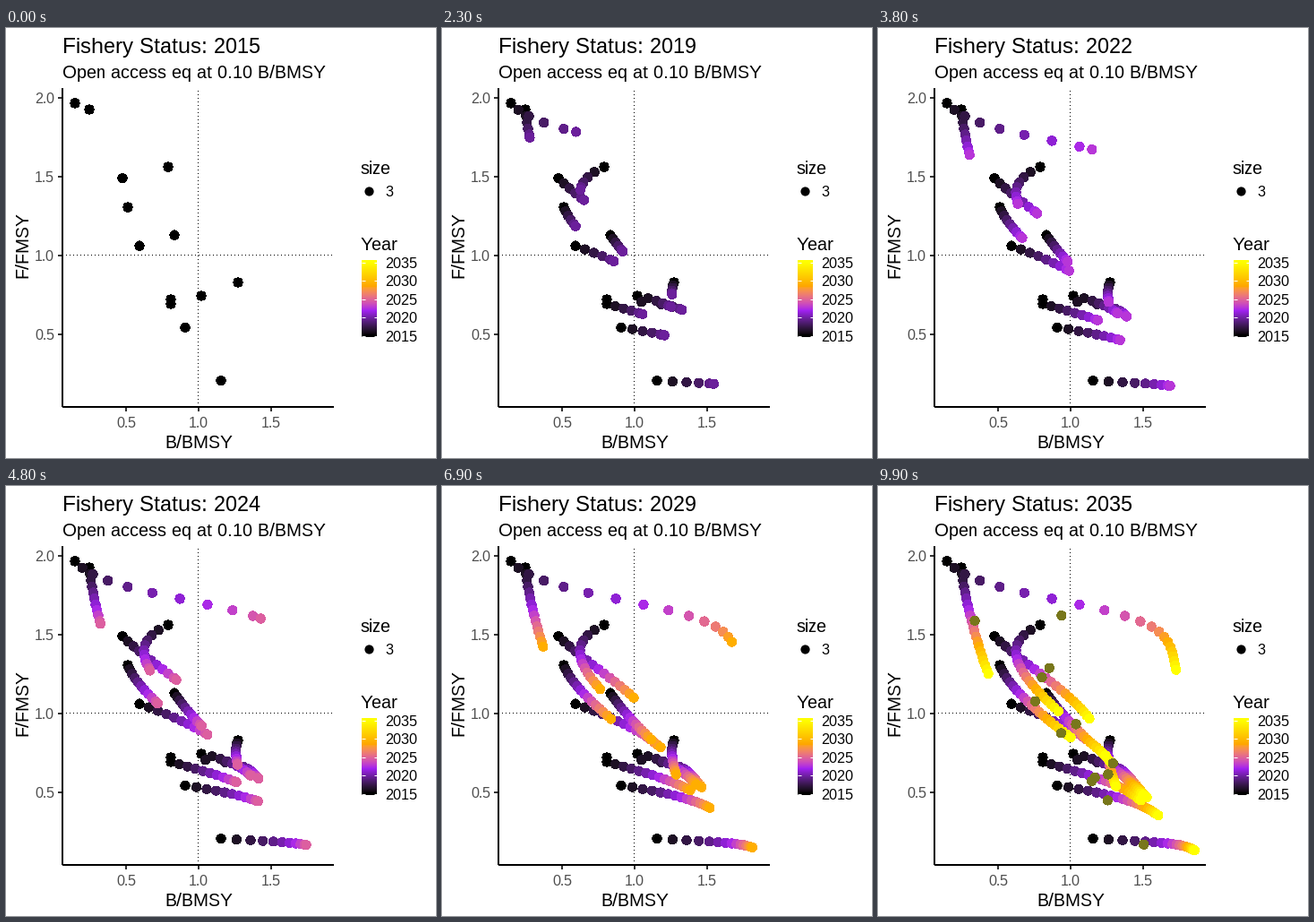
Recreate the animation shown at these times as a matplotlib script. Size 480 by 480 pixels, loop 10 s.

```python
import numpy as np
import matplotlib.pyplot as plt
from matplotlib.animation import FuncAnimation

plt.rcParams.update({"font.family": "Liberation Sans",
                     "text.hinting": "native", "text.hinting_factor": 1})

SIZE, DPI = 480, 96
PX = 72 / DPI                      # one pixel in points
LEFT, RIGHT, TOP, BOTTOM = 63, 366, 67, 423
FIRST, LAST = 2015, 2035
YEARS = LAST - FIRST
F_DECAY = 0.9787                   # yearly change of fishing pressure


def x_px(biomass):
    return 215 + 162 * (biomass - 1)


def y_px(pressure):
    return 254 - 176.4 * (pressure - 1)


def fishery(pressure, start, drift, jump, rate, lag=0):
    """Yearly path: steady drift plus a saturating recovery, F decaying."""
    t = np.arange(YEARS + 1)
    left = np.exp(-rate * t)
    x = start + drift * t + jump * (1 - left) / (1 + lag * left)
    return np.column_stack([x, y_px(pressure * F_DECAY ** t)])


# Positions by (year, fishery, xy)
track = np.stack([
    fishery(1.964, 77, 0.65, 243, 0.48, lag=18.3),
    fishery(1.924, 93, 1.75, -5, 0.2),
    fishery(1.488, 130, 0, 130, 0.13, lag=1.83),
    fishery(1.561, 181, 4.4, -68, 0.255),
    fishery(1.306, 136, 4.4, -9, 0.3),
    fishery(1.062, 149, 1, 98, 0.15, lag=0.5),
    fishery(1.130, 188, 3.4, -2, 0.3),
    fishery(0.830, 259, 0.75, -8.5, 0.24),
    fishery(0.745, 218, 1.9, 40, 0.285),
    fishery(0.722, 184, 1.7, 82, 0.6),
    fishery(0.694, 184, 1, 96, 0.16, lag=0.8),
    fishery(0.546, 200, 1, 98, 0.16, lag=0.3),
    fishery(0.207, 240, 0.7, 100, 0.27, lag=0.55),
], axis=1)
COUNT = track.shape[1]

# CIE Lab conversions for the colour scale
TO_XYZ = np.array([[0.4124, 0.3576, 0.1805],
                   [0.2126, 0.7152, 0.0722],
                   [0.0193, 0.1192, 0.9505]])
WHITE = TO_XYZ.sum(axis=1)


def rgb_to_lab(rgb):
    linear = np.where(rgb > 0.04045, ((rgb + 0.055) / 1.055) ** 2.4, rgb / 12.92)
    r = linear @ TO_XYZ.T / WHITE
    f = np.where(r > 0.008856, np.cbrt(r), 7.787 * r + 16 / 116)
    x, y, z = f.T
    return np.stack([116 * y - 16, 500 * (x - y), 200 * (y - z)], axis=-1)


def lab_to_rgb(lab):
    light, a, b = lab.T
    y = (light + 16) / 116
    f = np.stack([y + a / 500, y, y - b / 200], axis=-1)
    r = np.where(f > 0.2069, f ** 3, (f - 16 / 116) / 7.787)
    linear = np.clip((r * WHITE) @ np.linalg.inv(TO_XYZ).T, 0, 1)
    rgb = np.where(linear > 0.0031308,
                   1.055 * linear ** (1 / 2.4) - 0.055, 12.92 * linear)
    return np.clip(rgb, 0, 1)


# black, purple, orange, yellow
ANCHORS = rgb_to_lab(np.array([[0, 0, 0], [160, 32, 240],
                               [255, 165, 0], [255, 255, 0]]) / 255)


def scale_lab(u):
    stops = np.linspace(0, 1, len(ANCHORS))
    return np.stack([np.interp(u, stops, c) for c in ANCHORS.T], axis=-1)


year_lab = scale_lab(np.linspace(0, 1, YEARS + 1))
year_rgb = lab_to_rgb(year_lab)

# Frames that show the halfway pose: every fifth, then every fourth
HALFWAY = [*range(3, 84, 5), *range(87, 100, 4)]

fig = plt.figure(figsize=(SIZE / DPI, SIZE / DPI), dpi=DPI, facecolor="white")
ax = fig.add_axes([0, 0, 1, 1])
ax.axis("off")


def line(x0, y0, x1, y1, color="black", width=2, **kw):
    ax.plot([x0, x1], [y0, y1], color=color, lw=width * PX,
            solid_capstyle="butt", **kw)


def label(x, y, s, pt, color="black", ha="left", **kw):
    return ax.text(x, y, s, fontsize=pt, color=color, ha=ha,
                   va="baseline", **kw)


def dots_at(x, y, **kw):
    return ax.scatter(x, y, s=(10.2 * PX) ** 2, c="black", linewidths=0,
                      antialiased=False, **kw)


# Reference lines
for ends in ((214.5, BOTTOM, 214.5, TOP), (LEFT, 253.5, RIGHT, 253.5)):
    line(*ends, width=1, linestyle=(0, (1, 3)), snap=False, zorder=1)

# Axes
TICK, TICK_TEXT = "#333333", "#4D4D4D"
for v in (0.5, 1.0, 1.5):
    x = x_px(v)
    line(x, BOTTOM, x, BOTTOM + 5, TICK)
    label(x, 446, f"{v:.1f}", 12, TICK_TEXT, "center")
for v in (0.5, 1.0, 1.5, 2.0):
    y = y_px(v)
    line(LEFT - 5, y, LEFT, y, TICK)
    label(54, y + 6, f"{v:.1f}", 12, TICK_TEXT, "right")
line(LEFT, TOP, LEFT, BOTTOM, zorder=4)
line(LEFT, BOTTOM, RIGHT, BOTTOM, zorder=4)
label(215, 469, "B/BMSY", 15, ha="center")
label(24.5, 242, "F/FMSY", 15, ha="center", rotation=90,
      rotation_mode="anchor")

title = label(63, 28, "", 18)
label(63, 56, "Open access eq at 0.10 B/BMSY", 15)

# Legends
label(395.5, 163, "size", 15)
dots_at([404.7], [182])
label(423.5, 188.5, "3", 12)

label(395.5, 248, "Year", 15)
BAR = (397, 414, 345, 259)
ramp = np.clip(np.linspace(1.025, -0.025, 86), 0, 1)
ax.imshow(lab_to_rgb(scale_lab(ramp))[:, None, :], extent=BAR, aspect="auto",
          interpolation="nearest", zorder=1)
for year in range(FIRST, LAST + 1, 5):
    y = 343.5 - 82 * (year - FIRST) / YEARS
    line(BAR[0], y, BAR[0] + 3.5, y, "white", 1)
    line(BAR[1] - 3.5, y, BAR[1], y, "white", 1)
    label(423.5, y + 6.3, str(year), 12)

dots = dots_at([], [], zorder=3)
ax.set_xlim(0, SIZE)
ax.set_ylim(SIZE, 0)


def draw(n):
    now = sum(h < n for h in HALFWAY)
    xy = track[:now + 1].reshape(-1, 2)
    rgb = np.repeat(year_rgb[:now + 1], COUNT, axis=0)
    if n in HALFWAY:
        after = (now + 1) % (YEARS + 1)
        xy = np.vstack([xy, (track[now] + track[after]) / 2])
        mixed = lab_to_rgb((year_lab[now] + year_lab[after]) / 2)
        rgb = np.vstack([rgb, np.tile(mixed, (COUNT, 1))])
    dots.set_offsets(xy)
    dots.set_facecolors(rgb)
    title.set_text(f"Fishery Status: {FIRST + now}")
    return dots, title


anim = FuncAnimation(fig, draw, frames=100, interval=100, repeat=True,
                     repeat_delay=0, init_func=lambda: draw(0))
plt.show()
```
